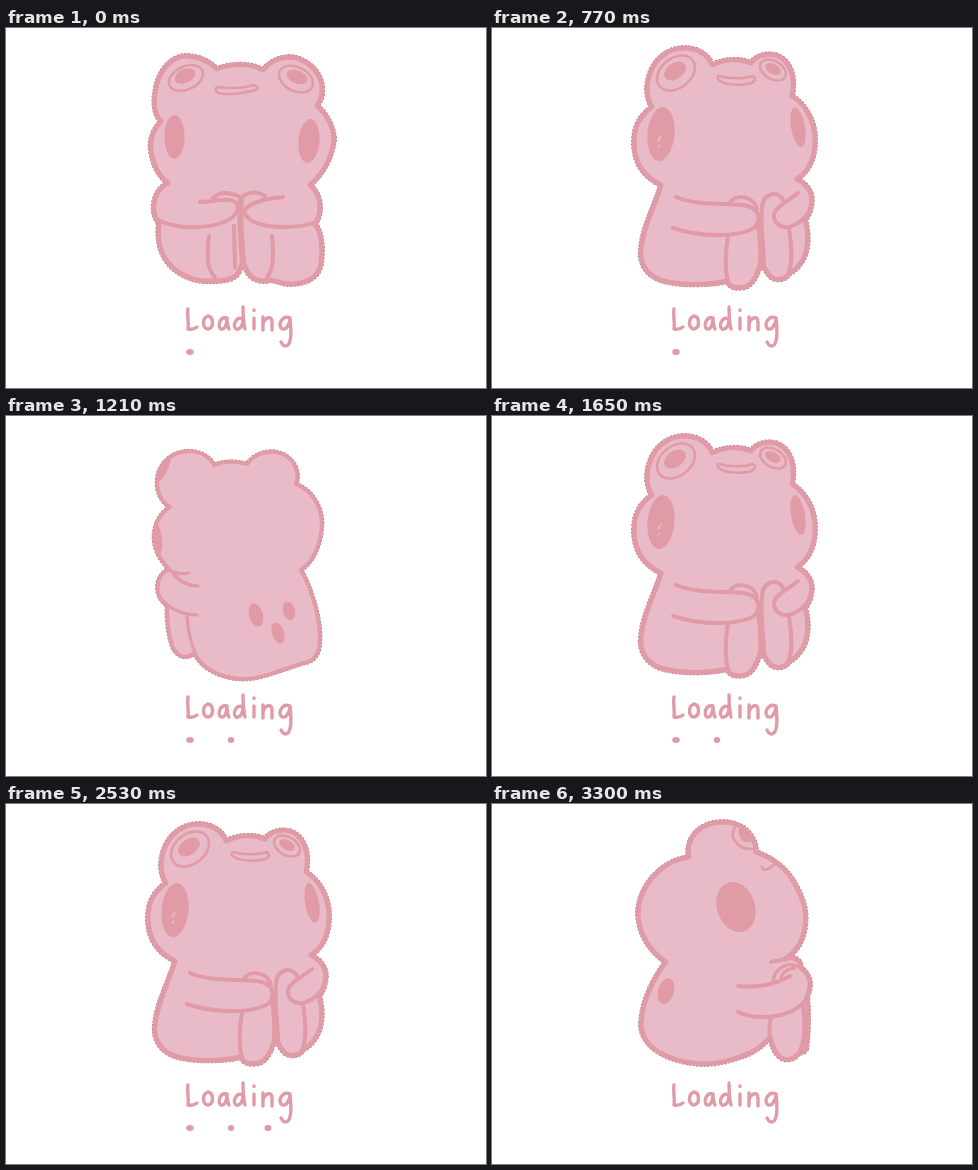
Animation of 480x360 px, one loop 3410 ms. Source, as an HTML page:

```html
<!DOCTYPE html>
<html lang="en">
<head>
<meta charset="utf-8">
<title>Loading</title>
<style>
  html, body { margin: 0; width: 100%; height: 100%; overflow: hidden; background: #fff; }
  svg { display: block; width: 100vw; height: 100vh; }
  path, ellipse { fill: none; stroke: #e09ba6; stroke-width: 4; stroke-linecap: round; stroke-linejoin: round; }
  .body { fill: #e9bac7; stroke-width: 5; }
  .body.thin { stroke-width: 4; }
  .edge { stroke: #a0747a; stroke-width: 5.8; stroke-dasharray: 2 1.5; stroke-linecap: butt; }
  .edge.thin { stroke-width: 4.8; }
  .soft { stroke-width: 2.5; }
  .fine { stroke-width: 3.2; }
  .fill { fill: #e09ba6; stroke: none; }
  .glint { stroke: #e9bac7; stroke-width: 1.5; }
  .crease { stroke-width: 6; }
  .word path { stroke-width: 3.4; }
</style>
</head>
<body>
<svg viewBox="0 0 480 360" role="img" aria-label="Loading">
  <g id="front" class="pose">
    <path class="body" d="M155 93C148 86 147 74 150 60C152 46 162 31 177 28C190 27 203 33 211 41C226 35 245 35 257 42C264 33 275 29 285 29C301 31 314 43 316 58C317 67 315 72 311 78C321 86 328 100 328 112C326 128 318 145 304 157C314 165 318 183 309 196C316 204 317 222 315 235C313 251 298 256 284 256C276 256 271 253 265 252C254 255 244 251 240 241Q237 230 234 241C230 254 215 253 197 253C172 250 148 232 153 195C144 185 146 163 162 155C153 148 147 138 145 122C143 112 148 101 155 93Z"/>
    <ellipse class="soft" cx="180" cy="50" rx="18" ry="11.5" transform="rotate(-25 180 50)"/>
    <ellipse class="fill" cx="179" cy="48" rx="11" ry="7" transform="rotate(-25 179 48)"/>
    <ellipse class="soft" cx="290" cy="51" rx="18" ry="12" transform="rotate(27 290 51)"/>
    <ellipse class="fill" cx="291" cy="49" rx="11" ry="6.5" transform="rotate(22 291 49)"/>
    <path class="soft" d="M211 59C221 61 238 60 248 57C254 59 252 62 245 63C235 66 221 67 212 65C209 63 209 60 211 59Z"/>
    <ellipse class="fill" cx="168.500" cy="109" rx="10" ry="22"/>
    <ellipse class="fill" cx="303" cy="113" rx="10.5" ry="22" transform="rotate(5 303 113)"/>
    <path d="M194 174C210 174 228 167 232 178C232 194 205 199 191 199C173 200 160 196 152 192M207 170Q216 161 232 168M235 170Q246 160 259 168M277 169C256 171 240 176 238 184C243 196 261 199 278 199C293 199 303 197 310 194"/>
    <path d="M203 208C201 226 200 240 209 249M228 198L229 240M266 208C268 227 267 243 261 249"/>
    <path class="crease" d="M235 172C233 195 236 218 237 234"/>
  </g>

  <g id="quarter" class="pose">
    <path class="body" d="M160 79C148 62 158 21 192 20C207 20 217 28 220 37C232 31 247 30 259 35C265 26 281 23 291 31C301 39 303 55 300 68C314 77 323 93 323 112C323 131 316 144 305 151C316 157 322 166 319 178C318 186 315 189 313 192C318 208 316 226 308 236C303 243 299 244 297 246C293 252 284 253 279 249C273 243 272 239 270 231C267 241 263 256 253 259C244 261 237 259 235 253C220 257 190 258 172 253C155 249 147 235 149 221C151 198 163 178 169 157C150 148 142 133 142 114C142 97 149 87 160 79Z"/>
    <ellipse class="soft" cx="184" cy="45" rx="21" ry="15" transform="rotate(-38 184 45)"/>
    <ellipse class="fill" cx="183" cy="43" rx="12" ry="8" transform="rotate(-35 183 43)"/>
    <ellipse class="soft" cx="281" cy="42" rx="14" ry="9" transform="rotate(30 281 42)"/>
    <ellipse class="fill" cx="281" cy="41" rx="8.5" ry="5" transform="rotate(30 281 41)"/>
    <path class="soft" d="M227 48C237 51 252 51 261 48C266 52 260 56 254 56C244 58 233 56 228 53C225 51 225 48 227 48Z"/>
    <ellipse class="fill" cx="169" cy="106" rx="13.5" ry="27" transform="rotate(5 169 106)"/>
    <path class="glint" d="M169 108L166 113M168 117L166 119"/>
    <ellipse class="fill" cx="306" cy="99" rx="7" ry="20" transform="rotate(-10 306 99)"/>
    <path d="M184 169C205 178 235 175 251 177C267 179 270 191 263 199C250 209 210 210 181 200M238 175C243 166 261 167 265 181M306 165C297 173 285 177 282 186C281 198 293 201 300 198C308 195 314 190 318 182"/>
    <path d="M236 208C233 226 233 242 236 255M266 198C269 212 268 228 268 240M272 238C272 218 268 201 270 180C270 164 289 161 292 175M297 201C300 220 301 235 296 246"/>
  </g>

  <g id="side" class="pose">
    <path class="body" d="M197 53C193 35 207 18 231 18C251 18 264 32 264 48C278 53 294 63 303 80C312 96 315 108 313 122C311 138 304 148 293 155C301 152 309 155 309 164C319 171 320 182 315 193C317 210 316 230 314 245C311 250 308 247 305 251C301 256 293 257 288 253C282 248 280 241 278 233C268 245 258 250 245 254C233 258 222 260 210 260C174 258 149 242 149 220C150 197 162 173 174 158C160 149 147 132 146 110C146 84 168 57 197 53Z"/>
    <path class="soft" d="M243 23C237 33 244 46 263 45M270 63C271 68 276 66 283 60"/>
    <path class="fill" d="M247 24C253 26 258 31 260 37C252 41 245 35 247 24Z"/>
    <ellipse class="fill" cx="244" cy="103" rx="19" ry="25.5" transform="rotate(-18 244 103)"/>
    <ellipse class="fill" cx="174" cy="187" rx="8" ry="13" transform="rotate(15 174 187)"/>
    <path d="M246 182C263 184 283 181 298 172M246 208C263 216 287 214 302 206C311 201 316 195 317 187M279 158Q289 157 299 153"/>
    <path class="fine" d="M281 178C282 164 296 156 310 164M289 176C289 169 295 165 302 164"/>
    <path d="M279 214C277 222 277 229 278 236M311 202C313 218 313 236 308 247"/>
  </g>

  <g id="rear" class="pose">
    <path class="body thin" d="M164 91C150 83 147 62 157 48C171 30 199 32 208 49C218 45 230 45 241 48C253 31 281 31 290 52C292 58 292 63 290 68C306 74 316 91 316 108C315 130 306 147 295 154C305 171 314 200 314 222C314 236 310 243 302 246C278 252 258 263 236 263C213 262 196 252 188 237C180 245 168 240 165 226C161 212 161 201 161 189C148 181 148 160 163 153C152 142 148 131 148 120C149 105 156 96 164 91Z"/>
    <path class="fill" d="M152 66C151 52 156 43 165 42C163 52 159 62 152 66Z"/>
    <path class="fill" d="M148 106C155 106 159 130 154 139C150 135 147 120 148 106Z"/>
    <path class="fine" d="M163 154Q172 159 183 157M167 157Q175 169 192 170M161 189Q175 199 191 199M181 200C182 215 185 228 190 239"/>
    <ellipse class="fill" cx="250" cy="199" rx="7" ry="12" transform="rotate(-15 250 199)"/>
    <ellipse class="fill" cx="283" cy="195" rx="6" ry="9.5" transform="rotate(-15 283 195)"/>
    <ellipse class="fill" cx="272" cy="217" rx="6" ry="11" transform="rotate(-20 272 217)"/>
  </g>

  <g id="back" class="pose">
    <path class="body thin" d="M160 80C147 62 154 30 184 30C197 30 207 37 211 44C226 39 243 39 257 44C264 34 276 29 288 31C312 34 320 60 308 80C319 88 324 100 323 114C322 134 314 147 300 156C314 178 321 205 316 228C310 252 270 261 234 261C198 261 158 252 152 228C147 205 154 178 168 156C154 147 146 134 145 114C144 100 149 88 160 80Z"/>
    <ellipse class="fill" cx="215" cy="197" rx="6.5" ry="11" transform="rotate(8 215 197)"/>
    <ellipse class="fill" cx="253" cy="197" rx="6.5" ry="11" transform="rotate(-8 253 197)"/>
    <ellipse class="fill" cx="234" cy="217" rx="6.5" ry="11"/>
  </g>

  <g class="word">
    <path d="M182 281C181 288 183 295 182 301Q187 302 191 299"/>
    <path d="M202 288C196 290 196 300 202 301C208 300 208 289 202 288"/>
    <path d="M221 290C214 288 211 298 215 301C219 302 221 296 221 290Q221 297 223 301"/>
    <path d="M237 291C230 288 226 298 230 301C234 302 237 298 237 291M237 279Q237 292 239 301"/>
    <path d="M248 290V301M248 282V282.5"/>
    <path d="M257 289V302M257 296C259 289 266 287 266 294V302"/>
    <path d="M284 290C277 287 272 295 275 300C279 304 284 297 284 290C285 301 286 312 282 317Q278 320 275 314"/>
  </g>
  <ellipse class="fill dot" cx="184" cy="324" rx="3.8" ry="3"/>
  <ellipse class="fill dot" cx="225" cy="324" rx="3.2" ry="3"/>
  <ellipse class="fill dot" cx="262" cy="324" rx="3.5" ry="3"/>
</svg>
<script>
  const STEP = 110, FRAMES = 31;
  // One full turn in eighths; a leading "-" mirrors the pose.
  const TURN = ['front', '-quarter', '-side', 'rear', 'back', '-rear', 'side', 'quarter'];
  const poses = document.querySelectorAll('.pose');
  const dots = document.querySelectorAll('.dot');

  // Thin ragged rim behind each silhouette
  document.querySelectorAll('.body').forEach(body => {
    const rim = body.cloneNode();
    rim.classList.replace('body', 'edge');
    body.before(rim);
  });

  function draw(frame) {
    const pose = TURN[frame % TURN.length];
    const mirrored = pose[0] === '-';
    const id = pose.replace('-', '');
    poses.forEach(g => {
      g.style.display = g.id === id ? '' : 'none';
      g.setAttribute('transform', mirrored ? 'matrix(-1 0 0 1 468 0)' : '');
    });
    const count = (Math.floor(frame / TURN.length) + 1) % 4;
    dots.forEach((dot, i) => { dot.style.display = i < count ? '' : 'none'; });
  }

  const start = performance.now();
  function tick() {
    draw(Math.floor((performance.now() - start) / STEP) % FRAMES);
    requestAnimationFrame(tick);
  }
  tick();
</script>
</body>
</html>
```
